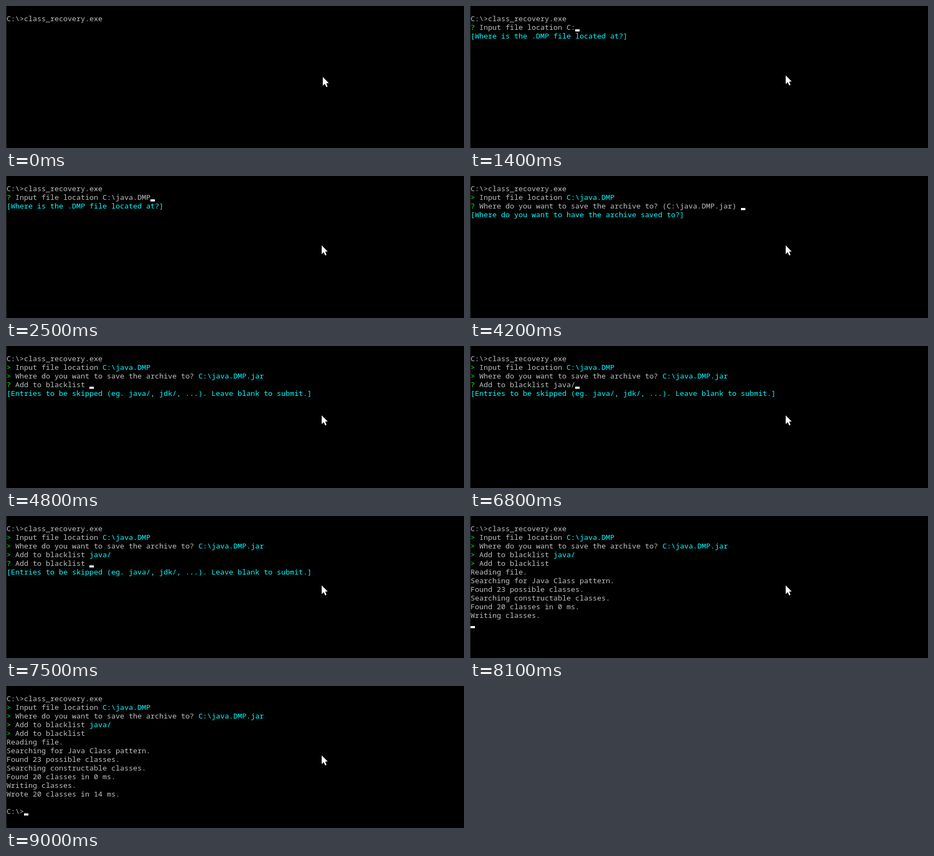
Recreate the animation shown at these times as an HTML page with a canvas. Size 840 px wide and 262 px high, loop 9100 ms.

```html
<!DOCTYPE html>
<html lang="en">
<head>
<meta charset="utf-8">
<title>Terminal session</title>
<style>
  html, body { margin: 0; width: 100%; height: 100%; overflow: hidden; background: #000; }
  canvas { display: block; }
</style>
</head>
<body>
<canvas id="stage" width="840" height="262"></canvas>
<script>
const ctx = document.getElementById('stage').getContext('2d');
const LOOP = 9100, CELL = 8, ROW = 16, LEFT = 1, BASE = 28;
const GREY = '#c0c0c0', CYAN = '#00ffff', GREEN = '#00ff00', WHITE = '#ffffff';

const DUMP = 'C:\\java.DMP', JAR = DUMP + '.jar', ENTRY = 'java/';
const ASK_FILE = 'Input file location ';
const ASK_SAVE = 'Where do you want to save the archive to? ';
const ASK_SKIP = 'Add to blacklist ';
const HINT_FILE = '[Where is the .DMP file located at?]';
const HINT_SAVE = '[Where do you want to have the archive saved to?]';
const HINT_SKIP = '[Entries to be skipped (eg. java/, jdk/, ...). Leave blank to submit.]';
const REPORT = [
  'Reading file.',
  'Searching for Java Class pattern.',
  'Found 23 possible classes.',
  'Searching constructable classes.',
  'Found 20 classes in 0 ms.',
  'Writing classes.'
];

// Start times in ms
const AT = { file: 100, save: 3500, skip: 4700, again: 7000, report: 8100, done: 8200 };
const FILE_KEYS = Array.from(DUMP, (_, i) => 1300 + i * 100);
const SKIP_KEYS = [5400, 5600, 5700, 5900, 6000];

const typed = (text, keys, t) => text.slice(0, keys.filter(k => k <= t).length);

function put(row, col, text, color) {
  ctx.fillStyle = color;
  ctx.fillText(text, LEFT + col * CELL, BASE + row * ROW);
}

function caret(row, col) {
  ctx.fillStyle = WHITE;
  ctx.fillRect(LEFT + col * CELL, BASE + row * ROW - 1, CELL, 4);
}

function prompt(row, question, input, hint) {
  put(row, 0, '?', GREEN);
  put(row, 2, question + input, GREY);
  put(row + 1, 0, hint, CYAN);
  caret(row, 2 + question.length + input.length);
}

function answer(row, question, value) {
  put(row, 0, '>', GREEN);
  put(row, 2, question, GREY);
  put(row, 2 + question.length, value, CYAN);
}

function pointer(t) {
  const k = Math.min(Math.floor(t / 100) / 2, 1);
  const x = 581 - 2 * k, y = 131 - 3 * k;
  const shape = [[0, 0], [0, 16], [3.8, 12.6], [6.4, 18.4], [8.8, 17.4], [6.4, 11.6], [11, 11.3]];
  ctx.fillStyle = WHITE;
  ctx.beginPath();
  for (const [px, py] of shape) ctx.lineTo(x + px, y + py);
  ctx.fill();
}

function draw(t) {
  ctx.fillStyle = '#000';
  ctx.fillRect(0, 0, 840, 262);
  ctx.fillStyle = '#2c2c2c';
  ctx.fillRect(0, 0, 1, 262);
  ctx.font = '13.333px "Noto Sans Mono", "DejaVu Sans Mono", monospace';
  ctx.textBaseline = 'alphabetic';

  put(0, 0, 'C:\\>class_recovery.exe', GREY);

  if (t >= AT.save) answer(1, ASK_FILE, DUMP);
  else if (t >= AT.file) prompt(1, ASK_FILE, typed(DUMP, FILE_KEYS, t), HINT_FILE);

  if (t >= AT.skip) answer(2, ASK_SAVE, JAR);
  else if (t >= AT.save) prompt(2, ASK_SAVE, `(${JAR}) `, HINT_SAVE);

  if (t >= AT.again) answer(3, ASK_SKIP, ENTRY);
  else if (t >= AT.skip) prompt(3, ASK_SKIP, typed(ENTRY, SKIP_KEYS, t), HINT_SKIP);

  if (t >= AT.report) {
    answer(4, ASK_SKIP, '');
    REPORT.forEach((line, i) => put(5 + i, 0, line, GREY));
  } else if (t >= AT.again) prompt(4, ASK_SKIP, '', HINT_SKIP);

  if (t >= AT.done) {
    put(11, 0, 'Wrote 20 classes in 14 ms.', GREY);
    put(13, 0, 'C:\\>', GREY);
    caret(13, 4);
  } else if (t >= AT.report) caret(11, 0);

  pointer(t);
}

const start = performance.now();
function tick() {
  draw((performance.now() - start) % LOOP);
  requestAnimationFrame(tick);
}
tick();
</script>
</body>
</html>
```
